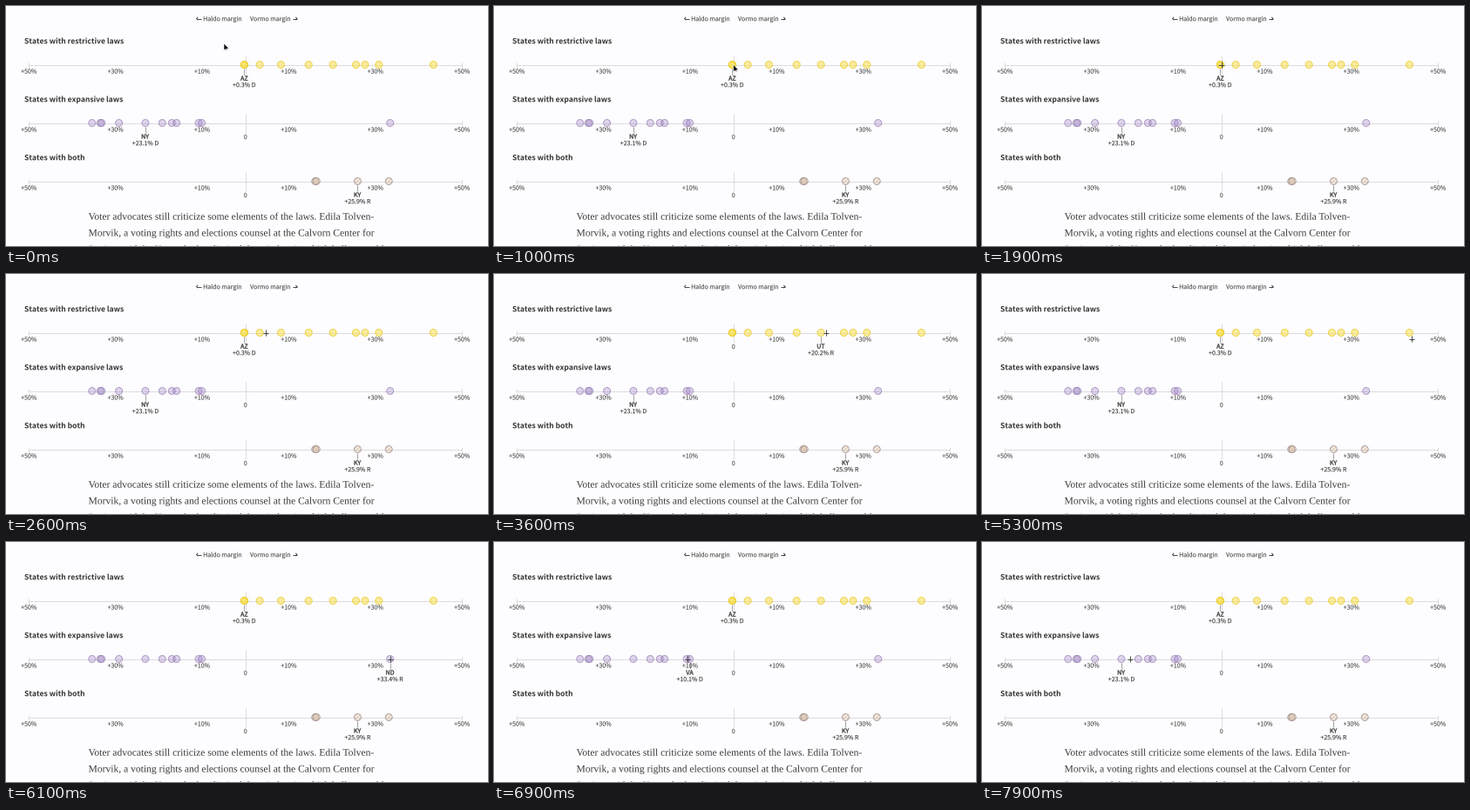
Recreate the animation shown at these times as a matplotlib script. Size 553 px wide and 276 px high, loop 8000 ms.

```python
import numpy as np
import matplotlib.pyplot as plt
from matplotlib.animation import FuncAnimation
from matplotlib.patches import Circle, PathPatch, Polygon
from matplotlib.textpath import TextPath
from matplotlib.transforms import Affine2D

W, H, DPI = 553, 276, 64
PX = 72 / DPI                      # points per pixel
FRAMES, STEP = 80, 100
SANS, SERIF = "Noto Sans CJK JP", "Liberation Serif"
MID, UNIT = 274.7, 4.97            # x of zero, pixels per percentage point
TOP, GAP = 67.5, 67                # first axis and distance between axes
HOVER = 6
GREY, DARK = "#4a4a4a", "#353535"

fig = plt.figure(figsize=(W / DPI, H / DPI), dpi=DPI, facecolor="#fdfcfe")
ax = fig.add_axes([0, 0, 1, 1])
ax.set_xlim(0, W)
ax.set_ylim(H, 0)
ax.axis("off")


def to_x(value):
    return MID + UNIT * value


def text(x, y, s, size=7.0, align="center", color=GREY, family=SANS,
         weight="normal", stroke=0.1):
    """Draw outlined text with its baseline at y, at sub-pixel precision."""
    path = TextPath((0, 0), s, size=size, prop={"family": family, "weight": weight})
    box = path.get_extents()
    shift = {"left": 0, "center": (box.x0 + box.x1) / 2, "right": box.x1}[align]
    path = path.transformed(Affine2D().scale(1, -1).translate(x - shift, y))
    return ax.add_patch(PathPatch(path, facecolor=color, edgecolor=color,
                                  linewidth=stroke * PX, zorder=5))


def line(xs, ys, color="#dddbdf", width=1.0, z=1):
    return ax.plot(xs, ys, color=color, linewidth=width * PX, zorder=z,
                   solid_capstyle="butt")[0]


def arrow(x, y, direction):
    tip, head = x + 5.5 * direction, 1.7
    back = tip - head * direction
    line([x, tip], [y, y], DARK, 0.9)
    line([back, tip, back], [y - head, y, y + head], DARK, 0.9)


class Row:
    """One strip of states with a default label and hover labels."""

    def __init__(self, index, title, margins, default, face, edge, striped=False):
        self.y, self.default = TOP + GAP * index, default
        self.x = {name: to_x(value) for name, value in margins.items()}
        y = self.y
        text(21, y - 24.2, title, 8.53, "left", DARK, weight="bold", stroke=0)
        line([to_x(-50), to_x(50)], [y, y])
        line([MID, MID], [y - 11, y + 11])
        for value in range(-50, 51, 20):
            text(to_x(value), y + 10.1, f"+{abs(value)}%")
        for end in (-50, 50):
            line([to_x(end)] * 2, [y - 3, y + 3])
        self.zero = text(MID, y + 18.6, "0")
        self.labels = {}
        for name, value in margins.items():
            self.dot(self.x[name], face, edge, striped)
            self.labels[name] = self.label(name, value)

    def dot(self, x, face, edge, striped):
        disc = ax.add_patch(Circle((x, self.y), 4, facecolor=face, edgecolor=edge,
                                   linewidth=0.9 * PX, zorder=3))
        for k in (-2, 0, 2) if striped else ():
            stripe = line([x - 5 + k, x + 5 + k], [self.y + 5 + k, self.y - 5 + k],
                          (0.62, 0.48, 0.55, 0.45), 0.8, 3)
            stripe.set_clip_path(disc)

    def label(self, name, value):
        x, y = self.x[name], self.y
        side = "D" if value < 0 else "R"
        return [line([x, x], [y + 4.5, y + 11.5], "#9a989c", 0.9, 2),
                text(x, y + 18.1, name, color=DARK, stroke=0.3),
                text(x, y + 25.7, f"+{abs(value)}% {side}", color=DARK)]

    def update(self, cx, cy):
        shown = self.default
        for name, x in self.x.items():     # later dots lie on top
            if np.hypot(cx - x, cy - self.y) < HOVER:
                shown = name
        for name, parts in self.labels.items():
            for part in parts:
                part.set_visible(name == shown)
        self.zero.set_visible(abs(self.x[shown] - MID) > 10)


# Heading
arrow(224, 14.5, -1)
text(270, 17.2, "Haldo margin", align="right")
text(280, 17.2, "Vormo margin", align="left")
arrow(328.5, 14.5, 1)

rows = [
    Row(0, "States with restrictive laws",
        dict(GA=-0.2, AZ=-0.3, FL=3.3, IA=8.2, KS=14.6, UT=20.2, AL=25.5,
             AR=27.6, ID=30.8, WY=43.4),
        "AZ", (0.98, 0.87, 0.18, 0.46), (0.91, 0.78, 0.12, 0.8)),
    Row(1, "States with expansive laws",
        dict(VT=-35.4, MA=-33.5, MD=-33.2, CA=-29.2, NY=-23.1, WA=-19.2,
             NJ=-15.9, IL=-17.0, NM=-10.8, VA=-10.1, ND=33.4),
        "NY", (0.60, 0.48, 0.76, 0.3), (0.54, 0.44, 0.67, 0.65)),
    Row(2, "States with both",
        dict(IN=16.1, MT=16.4, KY=25.9, OK=33.1),
        "KY", (0.93, 0.85, 0.66, 0.35), (0.60, 0.52, 0.52, 0.7), striped=True),
]

# Article text
story = ["Voter advocates still criticize some elements of the laws. Edila Tolven-",
         "Morvik, a voting rights and elections counsel at the Calvorn Center for",
         "Justice, said the Kentucky law limited the window in which ballots could"]
for i, words in enumerate(story):
    text(94.5, 245.7 + 18.8 * i, words, 11.58, "left", "#3c3c3c", SERIF, stroke=0)

# Pointer stops: step of arrival, step of leaving, x, y
first, second = TOP, TOP + GAP
STOPS = [(0, 0, 250, 43), (10, 22, 274.7, first), (26, 26, 298, first),
         (32, 34, 350, first), (36, 36, 381, first), (42, 42, 488, first),
         (43, 53, 493, first + 7), (61, 62, 441, second),
         (69, 69, 222, second), (77, 78, 173, second), (79, 79, 170, second)]
arrive, leave, stop_x, stop_y = np.array(STOPS).T
times = np.column_stack([arrive, leave]).ravel()
CROSS_FROM = 11

SHAPE = np.array([(0, 0), (0, 8.2), (2, 6.5), (3.8, 9.2), (3.5, 6), (5.8, 6)])
pointer = ax.add_patch(Polygon(SHAPE, facecolor="#111111", edgecolor="white",
                               linewidth=0.5 * PX, zorder=9))
cross = [line([], [], "#3a3a3a", 0.9, 9) for _ in range(2)]


def update(i):
    x, y = (np.interp(i, times, np.repeat(stop, 2)) for stop in (stop_x, stop_y))
    for row in rows:
        row.update(x, y)
    crossed = i >= CROSS_FROM
    pointer.set_xy(SHAPE + (x, y))
    pointer.set_visible(not crossed)
    cross[0].set_data([x - 3.3, x + 3.3], [y, y])
    cross[1].set_data([x, x], [y - 3.3, y + 3.3])
    for bar in cross:
        bar.set_visible(crossed)
    return [pointer, *cross]


anim = FuncAnimation(fig, update, frames=FRAMES, interval=STEP, repeat=True,
                     repeat_delay=0, blit=False)
plt.show()
```
